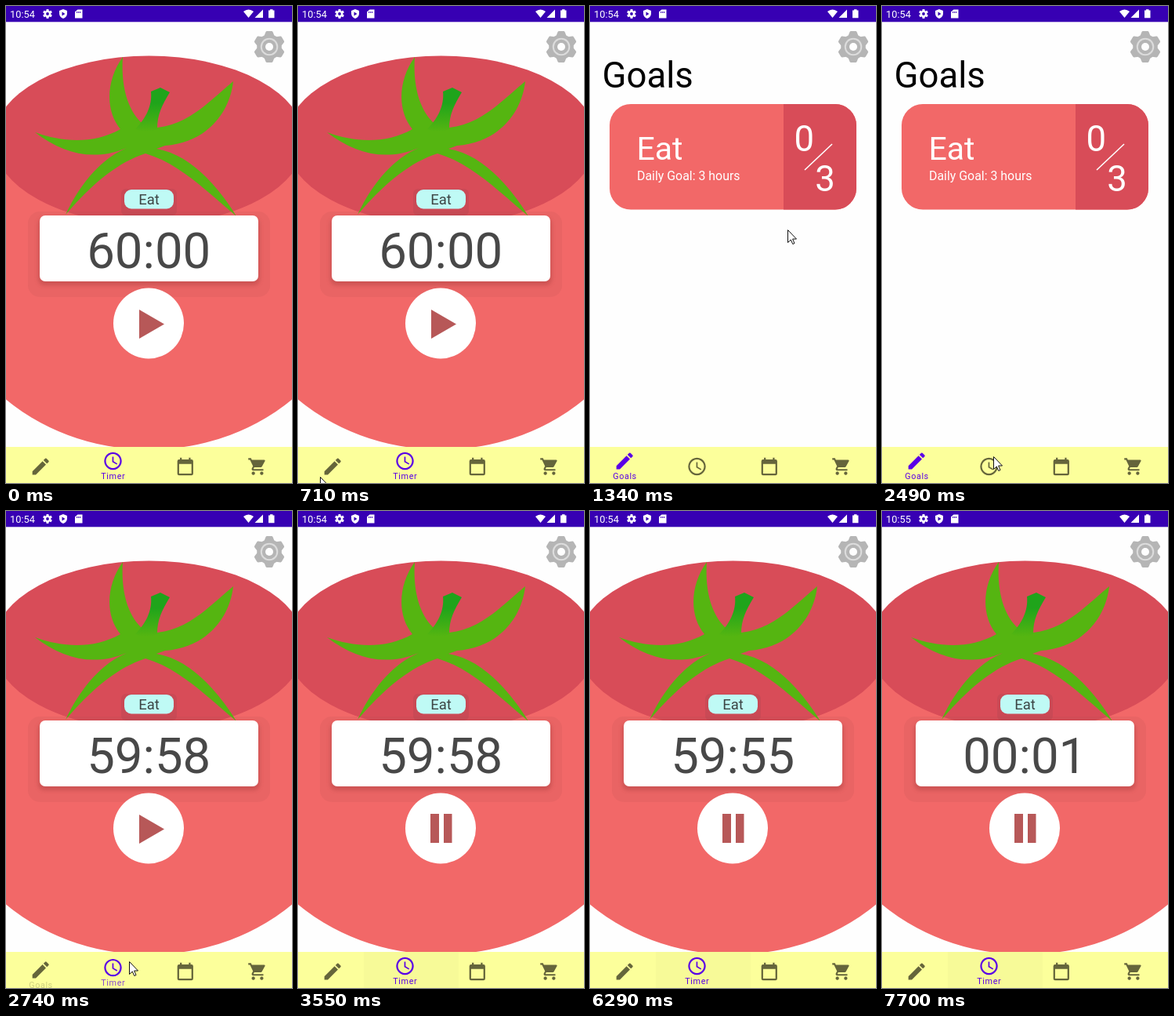
Write an HTML page that moves like this. It is 365 px wide and 608 px high and loops after 8000 ms.

```html
<!DOCTYPE html>
<html lang="en">
<head>
<meta charset="utf-8">
<title>Tomato timer</title>
<style>
  html, body { margin: 0; width: 100%; height: 100%; overflow: hidden; background: #fefefe; }
  svg { display: block; width: 100vw; height: 100vh; }
  text { font-family: Roboto, sans-serif; }
  .nav { fill: #65653b; }
  .nav.on { fill: #5a00e6; }
  .nav text { font-size: 10.8px; letter-spacing: .6px; text-anchor: middle; }
</style>
</head>
<body>
<svg viewBox="0 0 365 608">
  <defs>
    <linearGradient id="stemGreen" x1="0" y1="0" x2="0" y2="1">
      <stop offset=".35" stop-color="#1fa41b"/>
      <stop offset="1" stop-color="#55b511"/>
    </linearGradient>
    <filter id="blur" x="-20%" y="-40%" width="140%" height="180%"><feGaussianBlur stdDeviation="2.5"/></filter>
    <clipPath id="cardShape"><rect x="25" y="125" width="315" height="134.500" rx="27"/></clipPath>
  </defs>
  <rect width="365" height="608" fill="#fefefe"/>

  <g id="timerPage">
    <ellipse cx="182.500" cy="322.500" rx="270" ry="243" fill="#f26868"/>
    <ellipse cx="182.500" cy="171" rx="199" ry="107.500" fill="#d84c58"/>
    <g fill="#55b511">
      <path d="M149 65C147 95 152 128 172 148L193 155C233 150 257 124 290 96C285 140 253 174 203 178L192 182C235 189 271 230 294 268C258 238 222 201 178 188C140 200 106 231 76 266C92 232 118 196 154 181Q142 186 131 188C96 194 66 183 37 161C73 174 112 176 146 157C126 133 128 94 149 65Z"/>
    </g>
    <path d="M185 109L197 104L209 110C199 127 193 138 193 157Q180 163 165 157C178 144 187 127 185 109Z" fill="url(#stemGreen)"/>
    <rect x="28" y="262" width="309" height="109" rx="15" fill="#a04848" opacity=".12"/>
    <rect x="147" y="233" width="71" height="34" rx="6" fill="#803848" opacity=".16"/>
    <rect x="41" y="270" width="283" height="86" rx="8" fill="#a83c3c" opacity=".42" filter="url(#blur)"/>
    <rect x="151" y="234" width="63" height="24.500" rx="9" fill="#bffaf5"/>
    <text x="182.500" y="253" font-size="18.5" text-anchor="middle" fill="#3c4444">Eat</text>
    <rect x="43" y="267" width="279" height="84" rx="7" fill="#fff"/>
    <text id="countdown" x="182.200" y="333.500" font-size="63.500" text-anchor="middle" fill="#484848"></text>
    <circle cx="182" cy="404.500" r="45" fill="#fff"/>
    <path id="buttonIcon" fill="#b75858"/>
  </g>

  <g id="goalsPage">
    <text x="15.600" y="103.500" font-size="45.5">Goals</text>
    <g id="card" fill="#fff">
      <g clip-path="url(#cardShape)">
        <rect x="25" y="125" width="315" height="135" fill="#f26868"/>
        <rect x="247" y="125" width="93" height="135" fill="#d84c58"/>
      </g>
      <text x="59.500" y="195.500" font-size="41">Eat</text>
      <text x="60" y="222" font-size="15.9">Daily Goal: 3 hours</text>
      <text x="273.300" y="184.500" font-size="45.5" text-anchor="middle">0</text>
      <text x="300" y="235.500" font-size="45.5" text-anchor="middle">3</text>
      <path d="M274 209L309 176" stroke="#fff" stroke-width="1.600"/>
    </g>
  </g>

  <g transform="translate(336 52)" fill="#b5b5b5">
    <circle r="15.800"/>
    <g id="teeth"></g>
    <circle r="11.300" fill="#dcdcdc"/>
    <circle r="9.200"/>
    <circle r="5" fill="#fefefe"/>
  </g>

  <rect width="365" height="20.300" fill="#3700b3"/>
  <g fill="#fff">
    <text id="clock" x="5" y="14.600" font-size="12.8"></text>
    <g transform="translate(53 10)">
      <circle r="4.200"/>
      <g id="smallTeeth"></g>
      <circle r="1.900" fill="#3700b3"/>
    </g>
    <path d="M73 4l5 2v3.500c0 3-2 5.500-5 6.500c-3-1-5-3.500-5-6.500V6z"/>
    <path d="M71.500 7.500v5l4-2.500z" fill="#3700b3"/>
    <path d="M91.500 4.500h6v11h-9.500v-8z"/>
    <path d="M90.700 7v2m2-2v2m2-2v2" stroke="#3700b3"/>
    <path d="M303 7q6.500-5 13 0l-6.500 8z"/>
    <path d="M328 4.500v10.500h-10.500z"/>
    <path d="M335 5.500h2v-1.300h3.500v1.300h2v9.700h-7.500z"/>
  </g>

  <rect y="562" width="365" height="46" fill="#fcff9b"/>
  <rect id="ripple" x="84" y="562" width="121" height="46" opacity=".018"/>
  <g id="goalsTab" class="nav">
    <path transform="translate(44.200 580) scale(1.17) translate(-12 -12)" d="M3 17.250V21h3.750L17.810 9.940l-3.750-3.750zM20.710 7.040c.390-.390.390-1.020 0-1.410l-2.340-2.340a1 1 0 0 0-1.410 0l-1.830 1.830 3.750 3.750z"/>
    <text x="44.500" y="603">Goals</text>
  </g>
  <g id="timerTab" class="nav">
    <g transform="translate(136.500 580)">
      <path fill-rule="evenodd" d="M0-11.200a11.200 11.200 0 1 0 .010 0zM0-9a9 9 0 1 1-.010 0z"/>
      <path d="M-.900-5.500H.800V.300L5.700 3.200L4.800 4.600L-.900 1.200z"/>
    </g>
    <text x="136.800" y="603">Timer</text>
  </g>
  <g class="nav">
    <path transform="translate(228.800 587) scale(1.125) translate(-12 -12)" d="M19 4h-1V2h-2v2H8V2H6v2H5a2 2 0 0 0-2 2v14a2 2 0 0 0 2 2h14a2 2 0 0 0 2-2V6a2 2 0 0 0-2-2zm0 16H5V9h14z"/>
    <path transform="translate(321 587) scale(1.070) translate(-12 -12)" d="M7 18a2 2 0 1 0 .010 0zM1 2v2h2l3.600 7.590-1.350 2.450C4.520 15.370 5.480 17 7 17h12v-2H7.420a.25.25 0 0 1-.220-.370L8.100 13h7.450c.750 0 1.410-.410 1.750-1.030l3.580-6.490A1 1 0 0 0 20 4H5.210l-.940-2zM17 18a2 2 0 1 0 .010 0z"/>
  </g>

  <path id="cursor" d="M.500.500V16.500L4.300 13L6.800 18.500L9 17.500L6.600 12H11.500z" fill="#fff" stroke="#111"/>
</svg>
<script>
const LOOP = 8000;
const $ = id => document.getElementById(id);

const PLAY = "M170 387L202 405.500L170 424z";
const PAUSE = "M169 386h11v37h-11zM186 386h10.500v37h-10.500z";

// [start ms, value]: each value holds until the next start
const cursorSteps = [
  [0, null], [560, [29, 605]], [710, [28, 600]], [1100, [75, 510]], [1220, [165, 390]],
  [1340, [252, 285]], [1490, null], [1640, [328, 209]], [1760, [290, 305]], [1890, [243, 408]],
  [2040, [153, 545]], [2190, [144, 567]], [2340, [142, 570]], [2490, [142, 574]],
  [2740, [157, 574]], [2890, [238, 470]], [3010, [227, 413]], [3160, [205, 415]],
  [3400, [194, 490]], [3550, null]
];
const countdownSteps = [
  [0, "60:00"], [2740, "59:58"], [4390, "59:57"], [5320, "59:56"],
  [6290, "59:55"], [7410, "59:54"], [7700, "00:01"]
];
// 0: Timer tab is raised, 1: Goals tab is raised
const tabSteps = [[0, 0], [980, 1], [2740, .3], [2890, 0]];

const at = (steps, t) => steps.findLast(([start]) => start <= t)[1];
const show = (id, visible) => { $(id).style.display = visible ? "" : "none"; };

function addTeeth(id, count, path) {
  $(id).innerHTML = Array.from({ length: count }, (_, i) =>
    `<path d="${path}" transform="rotate(${i * 360 / count})"/>`).join("");
}

// Icon and label sink together while the label fades out
function drawTab(id, raised, selected) {
  const tab = $(id);
  tab.classList.toggle("on", selected);
  tab.setAttribute("transform", `translate(0 ${7 * (1 - raised)})`);
  tab.querySelector("text").setAttribute("opacity", raised);
}

function draw(t) {
  const onGoals = t >= 830 && t < 2740;
  show("goalsPage", onGoals);
  show("timerPage", !onGoals);
  show("card", t >= 980);
  show("ripple", t >= 2890);

  const raised = at(tabSteps, t);
  drawTab("goalsTab", raised, onGoals);
  drawTab("timerTab", 1 - raised, !onGoals);

  $("countdown").textContent = at(countdownSteps, t);
  $("clock").textContent = t < 7700 ? "10:54" : "10:55";
  $("buttonIcon").setAttribute("d", t < 3280 ? PLAY : PAUSE);

  const pos = at(cursorSteps, t);
  show("cursor", pos);
  if (pos) $("cursor").setAttribute("transform", `translate(${pos})`);
}

addTeeth("teeth", 6, "M-6.500-14L-4.500-19Q-4-20-3-20H3Q4-20 4.500-19L6.500-14z");
addTeeth("smallTeeth", 6, "M-1.800-3.500L-1.300-6H1.300L1.800-3.500z");

const begin = performance.now();
function tick() {
  draw((performance.now() - begin) % LOOP);
  requestAnimationFrame(tick);
}
tick();
</script>
</body>
</html>
```
